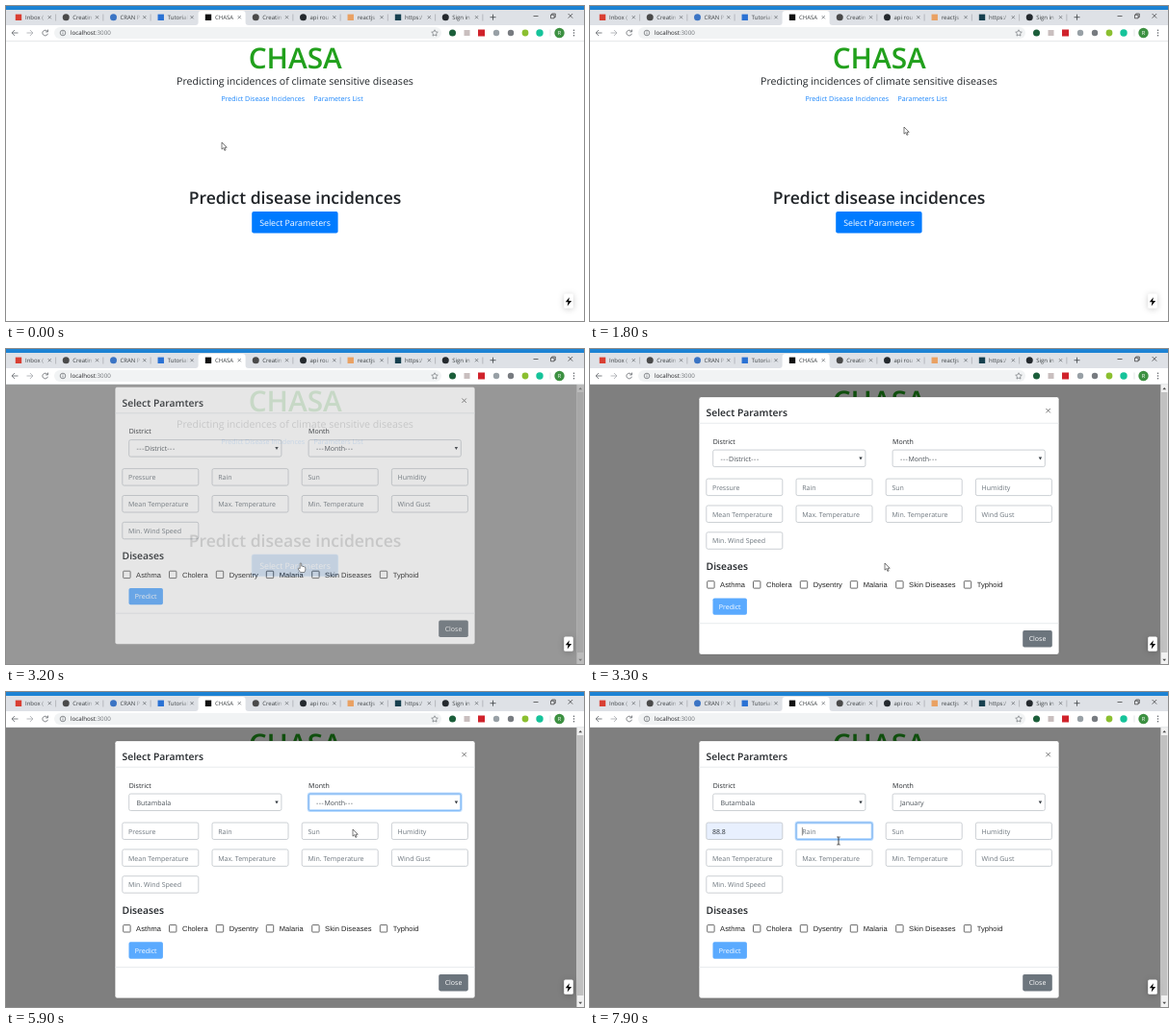
Recreate the animation shown at these times as an HTML page. Size 600 px wide and 328 px high, loop 8000 ms.

```html
<!DOCTYPE html>
<html lang="en">
<head>
<meta charset="utf-8">
<title>CHASA</title>
<style>
  html, body { margin: 0; width: 100%; height: 100%; overflow: hidden; background: #fff; }
  svg { display: block; width: 600px; height: 328px; }
  text { font-family: "Open Sans", "Noto Sans", sans-serif; text-rendering: geometricPrecision; white-space: pre; }
  .dash { letter-spacing: 0.6px; }
</style>
</head>
<body>
<svg id="stage" viewBox="0 0 600 328" xmlns="http://www.w3.org/2000/svg"></svg>
<script>
const LOOP = 8000;
const stage = document.getElementById('stage');

const text = (x, y, s, size = 7, fill = '#212529', extra = '') =>
  `<text x="${x}" y="${y}" font-size="${size}" fill="${fill}" ${extra}>${s}</text>`;
const rect = (x, y, w, h, fill, r = 0, extra = '') =>
  `<rect x="${x}" y="${y}" width="${w}" height="${h}" rx="${r}" fill="${fill}" ${extra}/>`;
const dot = (x, y, r, fill) => `<circle cx="${x}" cy="${y}" r="${r}" fill="${fill}"/>`;
const line = (d, stroke, w = 0.8, extra = '') =>
  `<path d="${d}" fill="none" stroke="${stroke}" stroke-width="${w}" ${extra}/>`;
const mid = 'text-anchor="middle"';
const bold = 'font-weight="600"';

// Browser frame
const tabs = [
  ['Inbox (', '#d93f33', 0], ['Creatin', '#4a4a4a', 1], ['CRAN P', '#3b74c4', 1],
  ['Tutorial', '#2a72d4', 0], ['CHASA', '#111', 0], ['Creatin', '#4a4a4a', 1],
  ['api rou', '#24292e', 1], ['reactjs', '#e9a163', 0], ['https:/', '#17404f', 0],
  ['Sign in', '#24292e', 1]
];

function tab([name, color, round], i) {
  const x = 3.6 + i * 49.25, cx = x + 9.4;
  const active = i === 4;
  const cross = x + 41.7;
  return (active ? `<path d="M${x - 4} 20q3 0 3-3V8q0-3 3-3h43q3 0 3 3v9q0 3 3 3z" fill="#fff"/>` : '') +
    (round ? dot(cx, 11.7, 3.5, color) : rect(cx - 3.2, 8.6, 6.4, 6.4, color)) +
    text(x + 16.4, 13.8, name, 6, '#3c4043') +
    (active ? '' : rect(x + 31, 6, 9, 12, 'url(#fade)')) +
    line(`M${cross - 1.6} 10.1l3.2 3.2m0-3.2l-3.2 3.2`, '#5f6368', 0.7) +
    (i === 3 || active ? '' : line(`M${x + 48} 8.5v7`, '#9a9da2', 0.6));
}

const chrome =
  '<linearGradient id="fade"><stop stop-color="#dee1e6" stop-opacity="0"/><stop offset="0.8" stop-color="#dee1e6"/></linearGradient>' +
  rect(0, 0, 600, 37, '#fff') + rect(0, 0, 600, 20, '#dee1e6') + rect(0, 0, 600, 4, '#1d83d4') +
  tabs.map(tab).join('') +
  line('M502.5 11.7h6m-3-3v6', '#3c4043') +
  line('M547.5 10.5h5', '#333', 0.7) +
  line('M565.5 9.2h3.6v3.6h-3.6zM566.7 9.2v-1.2h3.6v3.6h-1.2', '#333', 0.7) +
  line('M583.6 8l4.6 4.6m0-4.6l-4.6 4.6', '#333', 0.7) +
  line('M12.5 28h-6.4m3-3l-3 3l3 3', '#5f6368') +
  line('M21.5 28h6.4m-3-3l3 3l-3 3', '#a5a8ac') +
  line('M42.8 26.2a2.8 2.8 0 1 0 .6 2.6M43.5 24.6v2.3h-2.3', '#5f6368') +
  rect(50, 22, 402, 12, '#f1f3f4', 6) +
  line('M56.2 28a2.8 2.8 0 1 0 5.6 0a2.8 2.8 0 1 0-5.6 0M59 27.5v2M59 26.2v.7', '#5f6368', 0.7) +
  text(67, 30.2, 'localhost<tspan fill="#6c7075">:3000</tspan>', 6.2, '#202124') +
  line('M445 24.8l1 2.1 2.3.3-1.7 1.6.4 2.3-2-1.1-2 1.1.4-2.3-1.7-1.6 2.3-.3z', '#5f6368', 0.6) +
  dot(463.5, 28, 3.5, '#1b5e3a') + rect(475.5, 25, 6, 6, '#c9bfbf') +
  rect(490, 24.5, 7, 7, '#d0222b') + dot(509, 28, 3.2, '#98a0a6') +
  dot(524, 28, 3.2, '#777b80') + dot(539, 28, 3.4, '#8bbf30') + dot(554, 28, 3.7, '#15c39a') +
  line('M565 24.5v7', '#d0d3d7', 0.6) +
  dot(574.5, 28, 5.2, '#3d9142') + text(574.5, 30.1, 'R', 5.6, '#fff', mid) +
  [25.2, 28, 30.8].map(y => dot(589.5, y, 0.8, '#5f6368')).join('') +
  line('M0 36.6h600', '#dcdee0', 0.7);

// Landing page
const page =
  rect(0, 37, 600, 291, '#fff') +
  text(300.2, 65, 'CHASA', 29.8, '#21a01c', `${mid} ${bold}`) +
  text(300, 81.7, 'Predicting incidences of climate sensitive diseases', 10.6, '#212529', mid) +
  text(223.4, 99.3, 'Predict Disease Incidences', 7.06, '#1683fb') +
  text(319.6, 99.3, 'Parameters List', 7.06, '#1683fb') +
  text(300, 206.4, 'Predict disease incidences', 17.5, '#212529', `${mid} ${bold}`) +
  rect(255.2, 214, 89.4, 22.6, '#007bff', 2, 'id="button"') +
  text(300, 229.2, 'Select Parameters', 8.78, '#fff', mid);

// Parameter dialog
const border = 'stroke="#bfc4c9" stroke-width="0.8"';
const columns = [120.8, 214, 307.2, 400.4], rows = [136, 163.9, 191.7];
const hints = ['Pressure', 'Rain', 'Sun', 'Humidity', 'Mean Temperature',
  'Max. Temperature', 'Min. Temperature', 'Wind Gust', 'Min. Wind Speed'];

const field = (hint, i) => {
  const x = columns[i % 4], y = rows[i >> 2];
  return rect(x, y, 79, 17.5, '#fff', 1.8, `${border} id="box${i}"`) +
    text(x + 6.2, y + 11.7, hint, 7, '#6c757d', `id="field${i}"`);
};
const select = (id, x, label) =>
  text(x, 99.5, label, 7) +
  rect(x, 106, 158.2, 17.5, '#fff', 1.8, border) +
  text(x + 7.8, 117.5, '', 7, '#495057', `id="${id}"`) +
  `<path d="M${x + 151.6} 113.5h3.4l-1.7 2.9z" fill="#343a40"/>`;
const unset = name => `<tspan class="dash">---</tspan>${name}<tspan class="dash">---</tspan>`;
const checks = [['Asthma', 125.4], ['Cholera', 173.2], ['Dysentry', 222],
  ['Malaria', 274], ['Skin Diseases', 321.4], ['Typhoid', 392]];
const check = ([name, x]) =>
  rect(x - 3.7, 242.6, 7.4, 7.4, 'none', 0.7, 'stroke="#5a5a5a" stroke-width="0.9"') +
  text(x + 9.7, 249, name, 7.5, '#212121', 'style="font-family:\'Liberation Sans\',sans-serif" letter-spacing="0.07"');

const dialog =
  rect(113.2, 51, 373.6, 267.8, '#fff', 2.2, 'stroke="#000" stroke-opacity="0.25" stroke-width="0.6"') +
  text(120.6, 71.3, 'Select Paramters', 10.35, '#212529', bold) +
  line('M473.4 62.9l4.4 4.4m0-4.4l-4.4 4.4', '#777', 1) +
  line('M113.4 78.2h373.2M113.4 286.6h373.2', '#dee2e6', 0.7) +
  select('district', 127.7, 'District') + select('month', 314.1, 'Month') +
  hints.map(field).join('') +
  rect(0, 0, 10, 17.5, 'none', 1.8, 'id="ring" stroke="#007bff" stroke-opacity="0.25" stroke-width="2.8"') +
  rect(0, 0, 10, 17.5, 'none', 1.8, 'id="edge" stroke="#80bdff" stroke-width="0.8"') +
  line('M220.4 141v8.4', '#222', 0.5, 'id="caret"') +
  text(120.6, 230.6, 'Diseases', 10.35, '#212529', bold) +
  checks.map(check).join('') +
  rect(127.5, 260.3, 35.4, 17.4, '#5aaaff', 1.8) + text(145.2, 271.5, 'Predict', 7, '#fff', mid) +
  rect(449.2, 294, 30.6, 17.4, '#6c757d', 1.8) + text(464.5, 305.3, 'Close', 7, '#fff', mid);

const scrollbar = `<g id="scrollbar">` + rect(592.4, 37, 7.6, 291, '#f1f1f1') +
  rect(593, 45, 6.4, 271, '#c1c1c1') +
  `<path d="M594.3 42.2l1.9-2.2 1.9 2.2zM594.3 322.8l1.9 2.2 1.9-2.2z" fill="#505050"/></g>`;

const bolt = rect(579.2, 299.4, 9.6, 15.4, '#fff', 1.5, 'style="filter:drop-shadow(0 1px 3px #0003)"') +
  '<path d="M584.8 303.2l-4 5h2.7l-.8 4.2 4.4-5.4h-2.9z" fill="#000"/>';

const pointers = `<g id="pointer">
  <path id="arrow" d="M0 0v7.2l1.7-1.5 1.2 2.7 1.2-.5-1.2-2.6h2.3z" fill="#fff" stroke="#222" stroke-width="0.6"/>
  <path id="hand" d="M-.8 5V.3q.8-1 1.5 0V3.2q1.3-.5 1.5.3 1.2-.3 1.4.5 1.2-.1 1.2.8v2.3l-1 2.4H-.4L-3 5.8q.6-1.3 2.2-.2z" fill="#fff" stroke="#222" stroke-width="0.5"/>
  <path id="beam" d="M-1.6-4h1.2l.4.4.4-.4h1.2M0-3.6v7.2M-1.6 4h1.2l.4-.4.4.4h1.2" fill="none" stroke="#111" stroke-width="0.8"/>
</g>`;

stage.innerHTML = page + rect(0, 37, 600, 291, '#000', 0, 'id="shade"') +
  `<g id="dialog">${dialog}</g>` + scrollbar + bolt + chrome + pointers;

const ids = {};
stage.querySelectorAll('[id]').forEach(e => ids[e.id] = e);
const set = (id, name, value) => ids[id].setAttribute(name, value);
const show = (id, on) => { ids[id].style.display = on ? '' : 'none'; };
const clamp = p => Math.max(0, Math.min(1, p));

// Pointer stops: time, x, y
const path = [
  [0, 224, 142], [1800, 326, 126], [2650, 306, 223], [3350, 306, 223],
  [4100, 227, 119], [4450, 227, 119], [4900, 200, 200], [5100, 200, 200],
  [5500, 365, 116], [5650, 365, 116], [5900, 360, 143], [6200, 360, 143],
  [6550, 165, 146], [6950, 165, 146], [7150, 158, 160], [7250, 158, 160],
  [7650, 258, 155], [LOOP, 258, 155]
];

function pointerAt(t) {
  const i = path.findIndex(p => p[0] > t);
  const [t0, x0, y0] = path[i - 1], [t1, x1, y1] = path[i];
  const p = (t - t0) / (t1 - t0), e = p * p * (3 - 2 * p);
  return [x0 + (x1 - x0) * e, y0 + (y1 - y0) * e];
}

// Focused control: start, end, x, y, width
const focus = [
  [4400, 5600, 127.7, 106, 158.2], [5600, 6600, 314.1, 106, 158.2],
  [6600, 7600, columns[0], rows[0], 79], [7600, LOOP, columns[1], rows[0], 79]
];

function draw(t) {
  const [x, y] = pointerAt(t);
  const hand = t >= 2550 && t < 3300;
  const beam = (t >= 6500 && t < 7000) || t >= 7600;
  set('pointer', 'transform', `translate(${x} ${y})`);
  show('hand', hand);
  show('beam', beam);
  show('arrow', !hand && !beam);

  const pressed = t >= 2950;
  set('button', 'fill', hand ? '#0a64cc' : '#007bff');
  set('button', 'stroke', pressed ? '#268fff' : 'none');
  set('button', 'stroke-opacity', 0.6);

  const open = t - 3140;
  set('shade', 'opacity', 0.5 * clamp(open / 75));
  set('dialog', 'opacity', clamp(open / 80));
  set('dialog', 'transform', `translate(0 ${-22 * (1 - clamp(open / 190)) ** 1.7})`);
  set('scrollbar', 'opacity', clamp(open / 150));

  const active = focus.find(f => t >= f[0] && t < f[1]);
  for (const id of ['ring', 'edge']) {
    show(id, active);
    if (active) ['x', 'y', 'width'].forEach((name, i) => set(id, name, active[i + 2]));
  }
  show('caret', t >= 7600 && (t - 7600) % 1000 < 500);

  ids.district.innerHTML = t < 5100 ? unset('District') : 'Butambala';
  ids.month.innerHTML = t < 6200 ? unset('Month') : 'January';
  ids.field0.textContent = t < 6850 ? 'Pressure' : t < 7250 ? '8' : '88.8';
  set('field0', 'fill', t < 6850 ? '#6c757d' : '#30363c');
  set('box0', 'fill', t < 7250 ? '#fff' : '#e8f0fe');
}

const start = performance.now();
function tick() {
  draw((performance.now() - start) % LOOP);
  requestAnimationFrame(tick);
}
tick();
</script>
</body>
</html>
```
